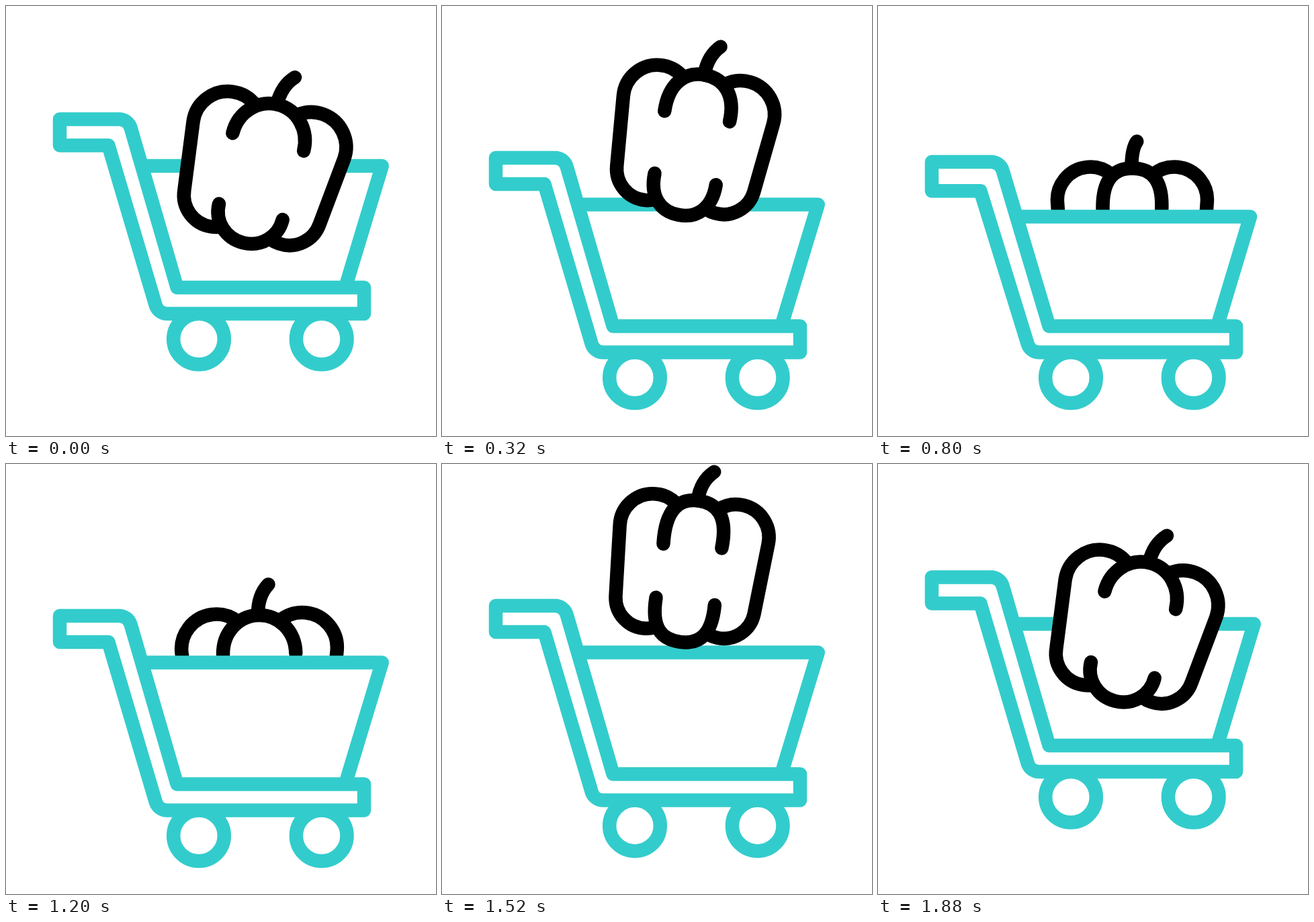
An HTML page with a canvas that plays this animation: 640 by 640 pixels, repeating every 2000 ms.

```html
<!DOCTYPE html>
<html lang="en">
<head>
<meta charset="utf-8">
<title>Shopping cart</title>
<style>
html, body { margin: 0; width: 100%; height: 100%; overflow: hidden; background: #fff; }
canvas { display: block; width: 640px; height: 640px; }
</style>
</head>
<body>
<canvas id="stage"></canvas>
<script>
const SIZE = 640, LOOP = 2000, STEP = 40, LINE = 20.5;
const TEAL = '#33cccc', BLACK = '#000';

const canvas = document.getElementById('stage');
const ctx = canvas.getContext('2d');
const ratio = window.devicePixelRatio || 1;
canvas.width = canvas.height = SIZE * ratio;

const mix = (a, b, k) => a + (b - a) * k;

// Eased progress from 0 to 1 between two times.
function span(t, from, to) {
  const k = Math.min(1, Math.max(0, (t - from) / (to - from)));
  return k * k * (3 - 2 * k);
}

function pose(t) {
  const leap = span(t, 160, 480), fall = span(t, 496, 800), settle = span(t, 800, 960);
  const rise = span(t, 1160, 1520), land = span(t, 1560, 1880);
  return {
    cart: 57.5 * (span(t, 40, 320) - span(t, 1400, 1760)),
    squash: span(t, 660, 800) - settle,
    x: 378.5 - 10.5 * (span(t, 80, 480) - fall + rise - land),
    y: 249.5 - 85.5 * leap + 183.5 * fall - 10.5 * settle - 177.3 * rise + 90.3 * land,
    turn: 14 - 15.3 * (span(t, 40, 960) - span(t, 1160, 1820)),
    slim: leap - settle + rise - land,
    stem: 15.3 - 8.3 * (span(t, 400, 800) - settle) + 2.5 * (rise - land),
    behind: t >= 480 && t < 1480
  };
}

function drawCart(p) {
  const q = p.squash;
  const top = 168.5 + 6 * q, low = 207.5 + 10.3 * q, rim = 238 + 18 * q;
  const path = new Path2D(
    `M80 ${top}H168C176.5 ${top} 183.5 ${top + 5.5} 185.8 ${top + 13.5}` +
    `L254.6 419H533V458H240C232 458 225.4 453 222.9 446L152.4 ${low}H80Z` +
    `M${205 + 5 * q} ${rim}H${559.7 - 5.7 * q}L505 419`);
  for (const x of [287, 469.7]) {
    path.moveTo(x + 37.8, 495.8);
    path.arc(x, 495.8, 37.8, 0, 2 * Math.PI);
  }
  ctx.save();
  ctx.translate(0, p.cart);
  ctx.strokeStyle = TEAL;
  ctx.stroke(path);
  ctx.restore();
}

// Outer lobe and side; dir is -1 for left, 1 for right.
function side(dir, s) {
  const half = new Path2D(), path = new Path2D();
  half.arc(mix(64, 62.5, s), mix(-4.6, -7, s), mix(52, 49, s), -2.25, 0.09);
  half.arc(mix(56.5, 58, s), 99, mix(47.5, 46, s), 0.09, 1.95);
  path.addPath(half, new DOMMatrix([dir, 0, 0, 1, 0, 0]));
  return path;
}

function arch(w, left, right, peak, bulge, s) {
  const f = 0.56 + 0.18 * s, h = w * (0.555 + 0.1 * s), path = new Path2D();
  path.moveTo(-w, left);
  path.bezierCurveTo(-w - bulge, mix(left, peak, f), -h, peak, 0, peak);
  path.bezierCurveTo(h, peak, w + bulge, mix(right, peak, f), w, right);
  return path;
}

function drawPepper(p) {
  const s = p.slim, end = mix(3.5, 14, s), foot = mix(110.5, 97, s);
  const parts = [
    side(-1, s),
    side(1, s),
    arch(mix(54.5, 43.5, s), end + 2.3 * s, end - 2.3 * s, -54, 3.5 * s, s),
    arch(mix(48.8, 44, s), foot, foot, 158, 1.5 * s, s)
  ];
  const tip = -99.5 + Math.max(0, 15 - p.stem) * 0.7;
  const stem = new Path2D(`M-1 -54Q-1 -83 ${p.stem} ${tip}`);

  ctx.save();
  ctx.translate(p.x, p.y);
  ctx.rotate(p.turn * Math.PI / 180);
  ctx.translate(0, -52);
  ctx.fillStyle = '#fff';
  ctx.strokeStyle = BLACK;
  ctx.fillRect(-42, -35, 84, 178);
  parts.forEach(part => ctx.fill(part));
  parts.forEach(part => ctx.stroke(part));
  ctx.stroke(stem);
  ctx.restore();
}

function draw(t) {
  const p = pose(t);
  ctx.setTransform(ratio, 0, 0, ratio, 0, 0);
  ctx.fillStyle = '#fff';
  ctx.fillRect(0, 0, SIZE, SIZE);
  ctx.lineWidth = LINE;
  ctx.lineCap = ctx.lineJoin = 'round';

  if (p.behind) {
    ctx.save();
    ctx.beginPath();
    ctx.rect(0, 0, SIZE, 238 + p.cart + 18 * p.squash);
    ctx.clip();
    drawPepper(p);
    ctx.restore();
    drawCart(p);
  } else {
    drawCart(p);
    drawPepper(p);
  }
}

let start = null;
function tick(now) {
  if (start === null) start = now;
  const t = (now - start) % LOOP;
  draw(Math.floor(t / STEP) * STEP);
  requestAnimationFrame(tick);
}
draw(0);
requestAnimationFrame(tick);
</script>
</body>
</html>
```
